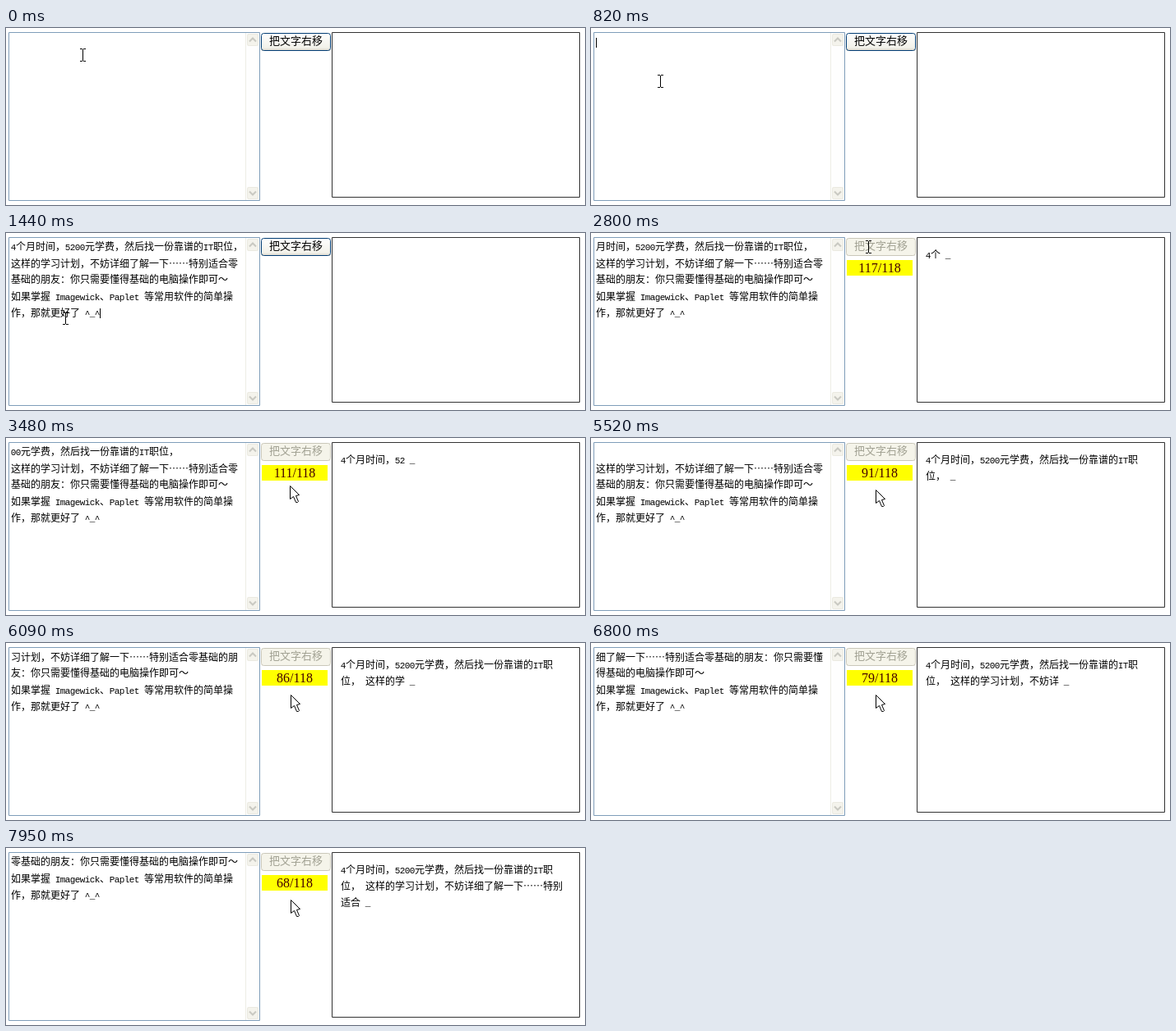
These frames come from a looping animation (704x216 px, 8 s). An HTML page with a canvas:

```html
<!DOCTYPE html>
<html lang="zh-CN">
<head>
<meta charset="utf-8">
<title>文字右移</title>
<style>
html, body { margin: 0; width: 704px; height: 216px; overflow: hidden; background: #fff; }
canvas { display: block; }
</style>
</head>
<body>
<canvas id="stage" width="704" height="216"></canvas>
<script>
const ctx = document.getElementById('stage').getContext('2d');
const LOOP = 8000, PASTE = 1440, PRESS = 2280, START = 2610;
const CJK = '"Noto Sans CJK SC", "Noto Sans CJK", sans-serif';
const TEXT = '4个月时间，5200元学费，然后找一份靠谱的IT职位，\r\n' +
  '这样的学习计划，不妨详细了解一下……特别适合零基础的朋友：你只需要懂得基础的电脑操作即可～\r\n' +
  '如果掌握 Imagewick、Paplet 等常用软件的简单操作，那就更好了 ^_^';

const isAscii = c => c < '\x7f';
const cell = c => isAscii(c) ? 6 : 12;
const width = s => [...s].reduce((sum, c) => sum + cell(c), 0);

function rect(x, y, w, h, color) {
  ctx.fillStyle = color;
  ctx.fillRect(x, y, w, h);
}

function frame(x, y, w, h, color, r = 0) {
  ctx.strokeStyle = color;
  ctx.lineWidth = 1;
  ctx.beginPath();
  ctx.roundRect(x + .5, y + .5, w - 1, h - 1, r);
  ctx.stroke();
}

function label(s, x, y, font, color) {
  ctx.font = font;
  ctx.fillStyle = color;
  ctx.textAlign = 'center';
  ctx.fillText(s, x, y);
}

// Greedy line breaking; a comma or colon never starts a line.
// Lines closed by a line feed keep it as their last character.
function wrap(s, max) {
  const lines = [];
  let line = '';
  for (let i = 0; i < s.length; i++) {
    const c = s[i], next = s[i + 1] || '';
    const need = c + ('，：、'.includes(next) ? next : '');
    if (c.trim() && width(line + need) > max) {
      lines.push(line);
      line = '';
    }
    line += c;
    if (c === '\n') {
      lines.push(line);
      line = '';
    }
  }
  return [...lines, line];
}

// Lines closed by a line feed sit one pixel higher than the others.
function paragraph(s, x, y, max) {
  wrap(s, max).forEach((line, row) => {
    const base = y + row * 20 - line.endsWith('\n');
    let left = x;
    for (const c of line.trimEnd()) {
      const w = cell(c);
      const font = isAscii(c) ? '11px "Liberation Mono", monospace' : '500 12px ' + CJK;
      label(c, left + w / 2, base, font, '#000');
      left += w;
    }
  });
}

// Number of characters already moved, shown at the pace of the screen refresh.
function movedCount(t) {
  if (t < START) return 0;
  const snap = (from, step) => from + Math.floor((t - from) / step) * step;
  if (t < 4240) return Math.max(1, 3 + Math.floor((snap(2800, 65.45) - 2875) / 101.5));
  return 16 + Math.floor((snap(4240, 63.96) - 4199) / 105.8);
}

const MOVES = [
  [460, 1240, 93, 33, 72, 104],
  [PASTE, 2220, 72, 104, 337, 17],
  [3240, 3540, 337, 17, 346, 63]
];

function pointerAt(t) {
  let pos = [93, 33];
  for (const [from, to, x0, y0, x1, y1] of MOVES) {
    if (t < from) break;
    const p = Math.min(1, (t - from) / (to - from)), e = p * p * (3 - 2 * p);
    pos = [Math.round(x0 + (x1 - x0) * e), Math.round(y0 + (y1 - y0) * e)];
  }
  return pos;
}

function beam(x, y) {
  rect(x - 3, y - 8, 3, 1, '#000');
  rect(x + 1, y - 8, 3, 1, '#000');
  rect(x, y - 7, 1, 14, '#000');
  rect(x - 3, y + 7, 3, 1, '#000');
  rect(x + 1, y + 7, 3, 1, '#000');
}

function arrow(x, y) {
  ctx.save();
  ctx.translate(x + .5, y + .5);
  ctx.beginPath();
  for (const [px, py] of [[0, 0], [0, 16], [4, 13], [7, 20], [9, 20], [10, 19], [7, 12], [11, 11]]) ctx.lineTo(px, py);
  ctx.closePath();
  ctx.fillStyle = '#fff';
  ctx.fill();
  ctx.strokeStyle = '#000';
  ctx.lineWidth = 1;
  ctx.stroke();
  ctx.restore();
}

function scrollButton(y, dir) {
  ctx.fillStyle = '#f4f3ec';
  ctx.beginPath();
  ctx.roundRect(293, y, 14, 15, 2);
  ctx.fill();
  frame(293, y, 14, 15, '#eae9e0', 2);
  ctx.strokeStyle = '#c9c9c2';
  ctx.lineWidth = 2;
  ctx.beginPath();
  ctx.moveTo(296, y + 7.5 - 2 * dir);
  ctx.lineTo(300, y + 7.5 + 2 * dir);
  ctx.lineTo(304, y + 7.5 - 2 * dir);
  ctx.stroke();
}

function button(disabled, hover, pressed) {
  const g = ctx.createLinearGradient(0, 6, 0, 28);
  const stops = disabled ? ['#f5f4ea', '#f5f4ea', '#f5f4ea']
    : pressed ? ['#d9d8d0', '#e3e2da', '#eeede7'] : ['#ffffff', '#f2f1ea', '#d8d2c6'];
  [0, .82, 1].forEach((at, i) => g.addColorStop(at, stops[i]));
  ctx.fillStyle = g;
  ctx.beginPath();
  ctx.roundRect(310, 6, 85, 22, 3);
  ctx.fill();
  if (hover && !pressed) {
    frame(311, 7, 83, 20, '#f8b330', 2);
    frame(312, 8, 81, 18, '#fbcf78', 1);
  }
  frame(310, 6, 85, 22, disabled ? '#c9c7ba' : '#003c74', 3);
  label('把文字右移', 352.5, 20, '13px ' + CJK, disabled ? '#a1a192' : '#000');
}

function draw(t) {
  const n = movedCount(t), running = n > 0;
  const [x, y] = pointerAt(t);
  const onButton = x >= 310 && x < 395 && y >= 6 && y < 28;

  rect(0, 0, 704, 216, '#fff');
  frame(3, 5, 306, 206, '#7f9db9');
  rect(291, 6, 17, 204, '#fefefe');
  rect(291, 6, 1, 204, '#eeede5');
  scrollButton(7, -1);
  scrollButton(194, 1);
  frame(396, 5, 302, 202, '#333');

  if (t >= PASTE) paragraph(TEXT.slice(n).replace(/\r/g, ''), 6, 22, 284);
  if (t >= 520 && t < 1050) rect(6, 12, 1, 12, '#000');
  if (t >= PASTE && t < 1970) rect(114, 92, 1, 12, '#000');

  button(running, onButton, t >= PRESS);
  if (running) {
    rect(311, 33, 80, 19, '#ff0');
    label(119 - n + '/118', 351, 48, '16px "Liberation Serif", serif', '#400');
    paragraph((TEXT.slice(0, n) + ' _').replace(/\s+/g, ' '), 407, 31, 280);
  }

  const overText = x < 291 || (running && onButton);
  (overText ? beam : arrow)(x, y);
}

function tick() {
  draw(performance.now() % LOOP);
  requestAnimationFrame(tick);
}
tick();
</script>
</body>
</html>
```
